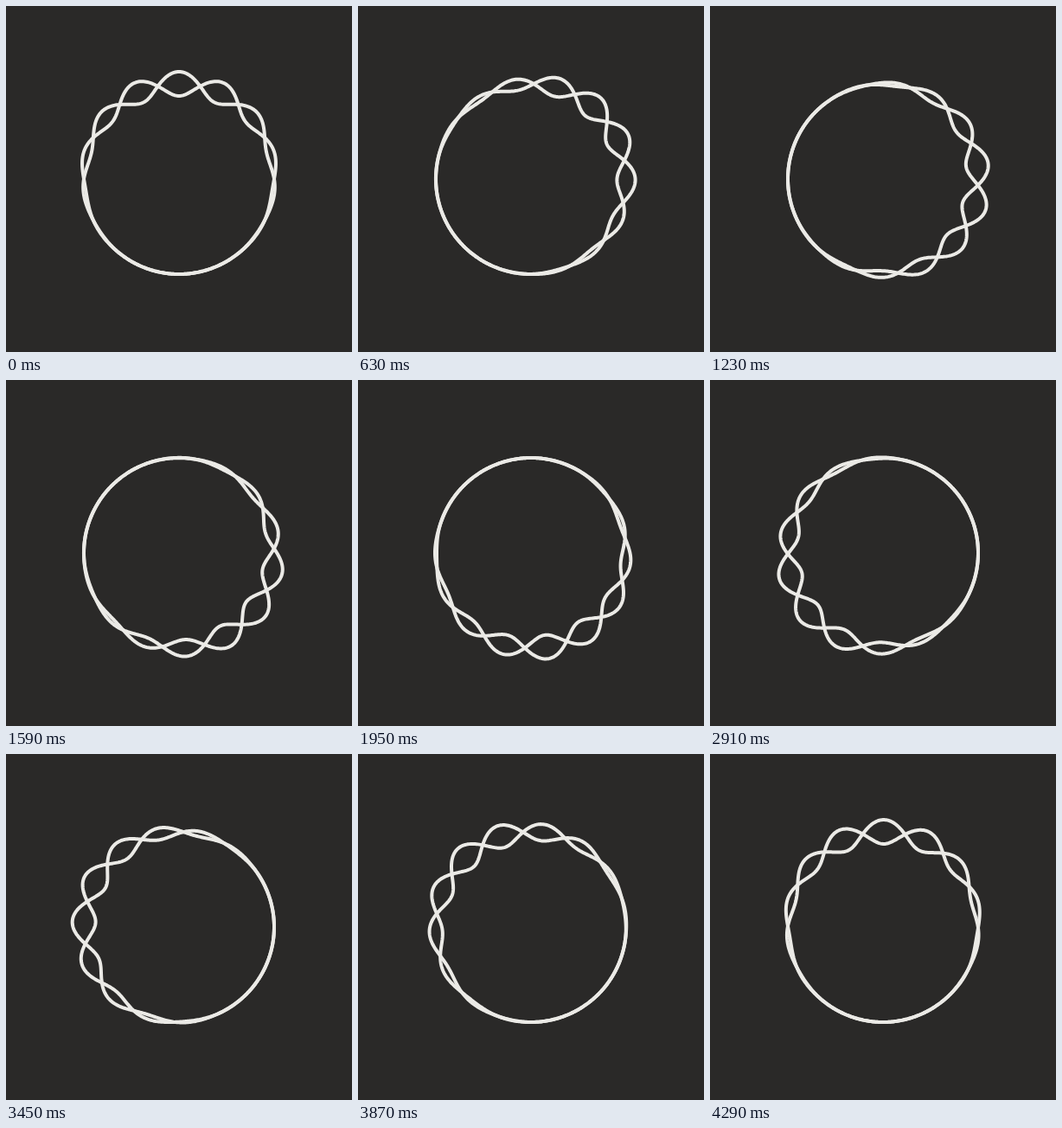
Animation of 400x400 px, one loop 4.32 s. Source, as an HTML page:

```html
<!DOCTYPE html>
<html lang="en">
<head>
<meta charset="utf-8">
<title>Braided ring</title>
<style>
  html, body { margin: 0; width: 100%; height: 100%; overflow: hidden; background: #2a2928; }
  svg { display: block; width: 100%; height: 100%; }
  path { fill: none; stroke: #ebeae6; stroke-width: 4; stroke-linejoin: round; }
</style>
</head>
<body>
<svg viewBox="0 0 400 400">
  <path id="strandA"/>
  <path id="strandB"/>
</svg>
<script>
const LOOP = 4320, STEP = 30;
const CENTER = 200, RADIUS = 110, SWING = 14;
const WAVES = 7, HALF_TURNS = 3, FALLOFF = 2.4;
const POINTS = 540;
const TAU = 2 * Math.PI;

const strands = [
  [document.getElementById('strandA'), 1],
  [document.getElementById('strandB'), -1],
];

// Angles run clockwise from the top; p is the loop progress from 0 to 1.
function offset(angle, p) {
  const envelope = Math.pow(0.5 + 0.5 * Math.cos(angle - TAU * p), FALLOFF);
  return SWING * envelope * Math.cos(WAVES * angle + HALF_TURNS * Math.PI * p);
}

function strandPath(p, sign) {
  const points = [];
  for (let i = 0; i < POINTS; i++) {
    const angle = TAU * i / POINTS;
    const r = RADIUS + sign * offset(angle, p);
    const x = CENTER + r * Math.sin(angle);
    const y = CENTER - r * Math.cos(angle);
    points.push(x.toFixed(2) + ' ' + y.toFixed(2));
  }
  return 'M' + points.join('L') + 'Z';
}

function draw(ms) {
  const p = Math.floor((ms % LOOP) / STEP) * STEP / LOOP;
  for (const [path, sign] of strands) path.setAttribute('d', strandPath(p, sign));
}

const start = performance.now();
function tick() {
  draw(performance.now() - start);
  requestAnimationFrame(tick);
}
tick();
</script>
</body>
</html>
```
